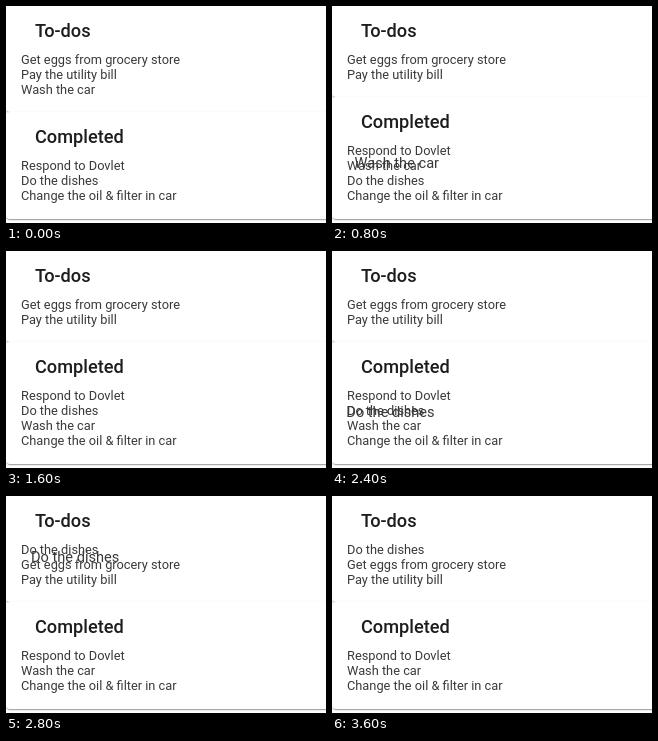
An HTML page that plays this animation: 320x217 px, repeating every 3800 ms.

```html
<!DOCTYPE html>
<html lang="en">
<head>
<meta charset="utf-8">
<title>To-do drag and drop</title>
<style>
  html, body { margin: 0; width: 100%; height: 100%; overflow: hidden; background: #fff; }
  body { position: relative; font-family: Roboto, sans-serif; color: #3a3a3a; }
  .card {
    position: relative; margin-right: -8px; padding: 46px 0 15px 15px;
    background: #fff; border-radius: 4px;
    box-shadow: 0 2px 1px -1px rgba(0,0,0,.2), 0 1px 1px rgba(0,0,0,.14), 0 1px 3px rgba(0,0,0,.12);
  }
  .card + .card { padding-bottom: 16px; }
  /* the tiny rotation keeps baselines from snapping to whole pixels */
  h2, ul { transform: translateY(.4px) rotate(.01deg); transform-origin: 0 0; }
  h2 {
    position: absolute; left: 29.4px; top: 14px; margin: 0;
    font-size: 18.2px; font-weight: 500; line-height: 21px; color: #1d1d1d;
  }
  ul { margin: 0; padding: 0; list-style: none; }
  li { height: 15px; font-size: 12.8px; line-height: 15px; white-space: nowrap; }
  #drag {
    position: absolute; left: 0; top: 0; color: #383838;
    font-size: 14.6px; line-height: 17px; white-space: nowrap;
  }
</style>
</head>
<body>
<div class="card"><h2>To-dos</h2><ul id="todo"></ul></div>
<div class="card"><h2>Completed</h2><ul id="done"></ul></div>
<div id="drag"></div>
<script>
  const LOOP = 3800;
  const items = {
    g: 'Get eggs from grocery store',
    p: 'Pay the utility bill',
    w: 'Wash the car',
    r: 'Respond to Dovlet',
    d: 'Do the dishes',
    c: 'Change the oil & filter in car'
  };

  // start time, to-do order, completed order, dragged item and its position
  const steps = [
    [0, 'gpw', 'rdc'],
    [600, 'gpw', 'rdc', 'w', 15, 77],
    [700, 'gpw', 'rdc', 'w', 19, 113],
    [800, 'gp', 'rwdc', 'w', 22.5, 149],
    [900, 'gp', 'rdwc', 'w', 22.5, 167],
    [1000, 'gp', 'rdwc', 'w', 22.5, 174],
    [1100, 'gp', 'rdwc'],
    [2400, 'gp', 'rdwc', 'd', 14.3, 153],
    [2500, 'gp', 'drwc', 'd', 20, 124],
    [2600, 'gp', 'drwc', 'd', 24, 86],
    [2700, 'gdp', 'rwc', 'd', 25, 68],
    [2800, 'dgp', 'rwc', 'd', 25, 53],
    [2900, 'dgp', 'rwc']
  ];

  const byId = id => document.getElementById(id);
  const todo = byId('todo'), done = byId('done'), drag = byId('drag');

  function fill(list, keys) {
    list.replaceChildren(...[...keys].map(key => {
      const li = document.createElement('li');
      li.textContent = items[key];
      return li;
    }));
  }

  function show([, open, closed, key, x, y]) {
    fill(todo, open);
    fill(done, closed);
    drag.textContent = key ? items[key] : '';
    if (key) drag.style.transform = `translate(${x}px, ${y}px)`;
  }

  const start = performance.now();
  let current;
  function tick() {
    const t = (performance.now() - start) % LOOP;
    const step = steps.findLast(s => s[0] <= t);
    if (step !== current) show(current = step);
    requestAnimationFrame(tick);
  }
  tick();
</script>
</body>
</html>
```
